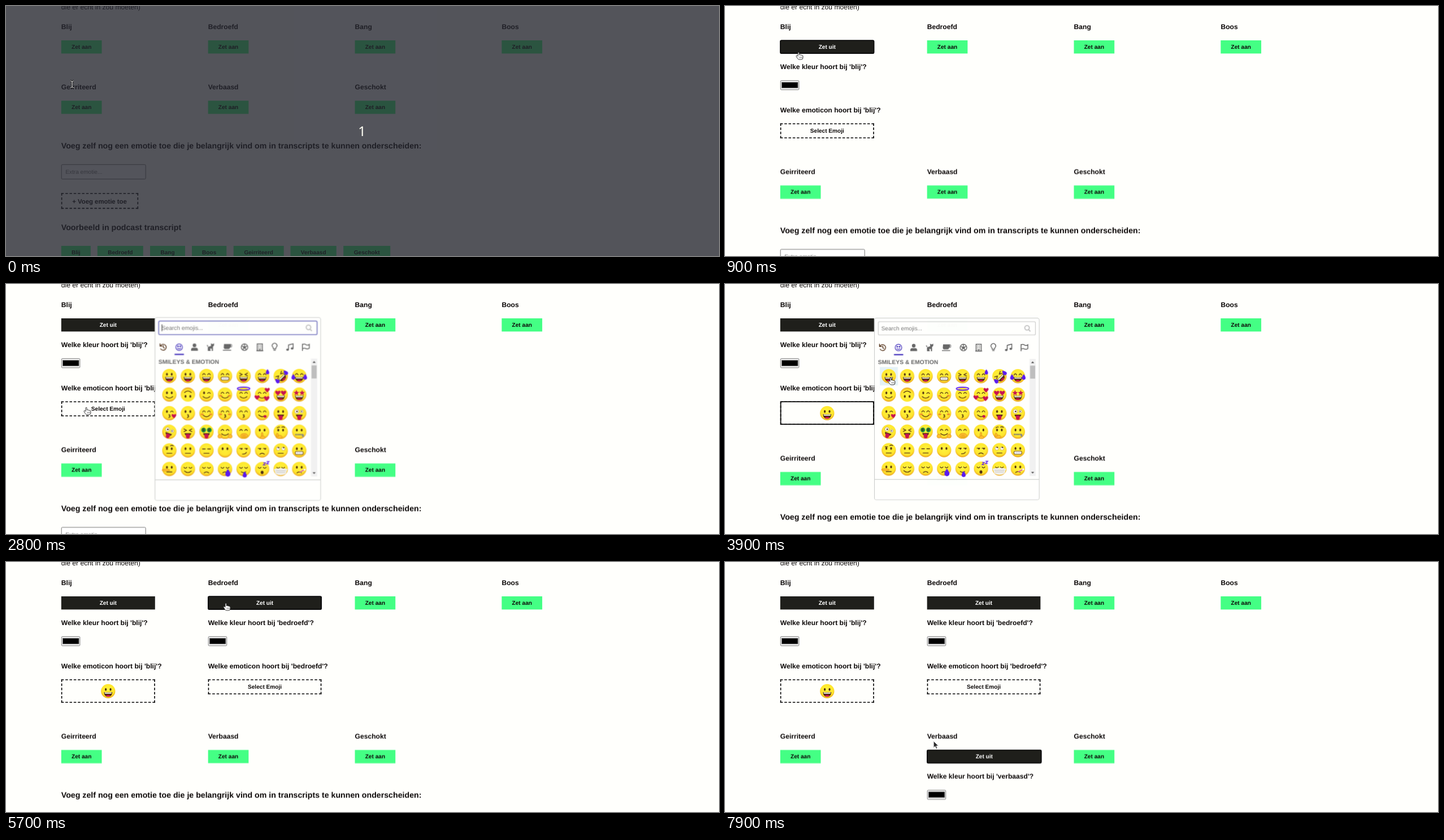
These frames come from a looping animation (1262 by 444 pixels, 8000 ms). An HTML page:

```html
<!DOCTYPE html>
<html lang="nl">
<head>
<meta charset="utf-8">
<title>Emoties</title>
<style>
html, body { margin: 0; width: 100%; height: 100%; overflow: hidden; background: #fffffc; }
svg { display: block; width: 1262px; height: 444px; }
text { font-family: "Liberation Sans", Arial, sans-serif; text-rendering: geometricPrecision; }
.b { font-weight: 700; }
.mid { text-anchor: middle; }
.line { fill: none; stroke: #4c2a10; stroke-width: 1.3; stroke-linecap: round; }
.icon { fill: none; stroke: #666; stroke-width: 1.5; }
.icon .f { fill: #666; stroke: none; }
.picker { transform-origin: 410px 222px; }
</style>
</head>
<body>
<svg id="stage" viewBox="0 0 1262 444"></svg>
<script>
const LOOP = 8000, GREEN = '#44ff84', RED = '#c8104f', BLUE = '#5a18f0';
let css = '', count = 0;

// Adds a held-step animation and returns its class name.
function steps(keys) {
  const id = 'k' + count++;
  const body = keys.map(([t, v]) => `${Math.max(0, t - 5) / LOOP * 100}%{${v}}`).join('');
  css += `@keyframes ${id}{${body}}.${id}{animation:${id} ${LOOP}ms step-end infinite}`;
  return id;
}

function during(from, to, body) {
  const keys = [[0, `opacity:${from ? 0 : 1}`]];
  if (from) keys.push([from, 'opacity:1']);
  if (to < LOOP) keys.push([to, 'opacity:0']);
  return `<g class="${steps(keys)}">${body}</g>`;
}

const moved = (keys, body) =>
  `<g class="${steps(keys.map(([t, y]) => [t, `transform:translateY(${y}px)`]))}">${body}</g>`;
const at = (x, y, body, more = '') => `<g transform="translate(${x} ${y})${more}">${body}</g>`;
const text = (x, y, s, size = 12.12, cls = 'b', fill = '#0c0808') =>
  `<text x="${x}" y="${y}" font-size="${size}" class="${cls}" fill="${fill}">${s}</text>`;
const rect = (x, y, w, h, fill, more = '') =>
  `<rect x="${x}" y="${y}" width="${w}" height="${h}" fill="${fill}" ${more}/>`;
const path = (d, more = 'class="line"') => `<path d="${d}" ${more}/>`;
const shape = (d, fill) => path(d, `fill="${fill}"`);
const dot = (x, y, rx, ry = rx, fill = '#4c2a10', more = '') =>
  `<ellipse cx="${x}" cy="${y}" rx="${rx}" ry="${ry}" fill="${fill}" ${more}/>`;

function dashed(x, y, w, h) {
  const side = (d, len) => {
    const n = Math.round((len + 3) / 7.5), gap = (len - n * 4.5) / (n - 1);
    return path(d, `fill="none" stroke="#000" stroke-width="1.6" stroke-dasharray="4.5 ${gap}"`);
  };
  return side(`M${x} ${y + .8}h${w}`, w) + side(`M${x} ${y + h - .8}h${w}`, w) +
    side(`M${x + .8} ${y}v${h}`, h) + side(`M${x + w - .8} ${y}v${h}`, h);
}

const ring = (x, y, w, h) =>
  rect(x + .2, y + .2, w - .4, h - .4, 'none', 'rx="2.2" stroke="#080808" stroke-width="1.7"');

const button = (x, y, w, label, dark) =>
  rect(x, y, w, 23.4, dark ? '#1f1f1b' : GREEN) +
  text(x + w / 2, y + 15.2, label, 10.1, 'b mid', dark ? '#fff' : '#0c0808');
const off = (x, y) => button(x, y, 71.7, 'Zet aan');

const colorBox = (x, y) =>
  rect(x + .5, y + .5, 32.6, 16.4, '#efefef', 'rx="1.5" stroke="#767676" stroke-width=".9"') +
  rect(x + 2.6, y + 3.6, 28.6, 10, '#000', 'stroke="#777" stroke-width=".7"');

const panel = (x, y, w, name) =>
  button(x, y, w, 'Zet uit', true) +
  text(x, y + 50.8, `Welke kleur hoort bij '${name}'?`) +
  colorBox(x, y + 70.9) +
  text(x, y + 127.5, `Welke emoticon hoort bij '${name}'?`);

const selectBox = (x, y, w) =>
  dashed(x, y, w, 26.6) + text(x + w / 2, y + 16.8, 'Select Emoji', 10.1, 'b mid');

// Emoji: one letter per facial part.
const heart = (x, y, s) =>
  path('M0 3.5Q-5-.5-3.3-2.6-1.5-4 0-1.8 1.5-4 3.3-2.6 5-.5 0 3.5z', `fill="${RED}" transform="translate(${x} ${y}) scale(${s})"`);
const star = x => path('M0-5l1.4 3.2 3.5.3-2.7 2.3.9 3.5L0 2.4l-3.1 1.9.9-3.5-2.7-2.3 3.5-.3z', `fill="${RED}" transform="translate(${x} -3)"`);
const drop = (x, y, s = 1) => path('M0-4q3 4 3 6a3 3 0 0 1-6 0q0-2 3-6z', `fill="${BLUE}" transform="translate(${x} ${y}) scale(${s})"`);
const hand = (x, y, rx, ry) => dot(x, y, rx, ry, '#ffc02c', 'stroke="#d98a14" stroke-width=".8"');
const white = (x, r) => dot(x, -3, r, r, '#fff', 'stroke="#9a6a20" stroke-width=".5"');
const eye = x => dot(x, -3, 1.6, 2.4);
const tongue = x => shape(`M${x - 3.4} 4h6.8v4q0 4-3.4 4t-3.4-4z`, RED);
const parts = {
  o: eye(-4.2) + eye(4.2),
  a: path('M-6.8-2q2.4-4.4 4.8 0M2-2q2.4-4.4 4.8 0'),
  u: path('M-6.8-3q2.4 3.4 4.8 0M2-3q2.4 3.4 4.8 0'),
  x: path('M-7-5l4.6 2.4-4.6 2.4M7-5l-4.6 2.4 4.6 2.4'),
  w: eye(-4.2) + path('M2-2q2.4-3.4 4.8 0'),
  h: heart(-5, -3, 1.25) + heart(5, -3, 1.25),
  s: star(-5) + star(5),
  l: path('M-7-2.5h5M2-2.5h5'),
  r: white(-4.6, 3) + white(4.6, 3) + dot(-4, -4.8, 1.2) + dot(5.2, -4.8, 1.2),
  c: white(-4.5, 3.6) + white(4.5, 2.6) + dot(-4, -3, 1.4) + dot(4.2, -3, 1),
  v: path('M-7-3.4h5M2-3.4h5') + dot(-3.6, -2.4, 1.3) + dot(5.2, -2.4, 1.3),
  d: dot(-5, -3, 4.2, 4.2, '#109848') + dot(5, -3, 4.2, 4.2, '#109848') +
     path('M-3.8-5q-3.4-.6-2.6 1.2t2.4 1.3-2.6 1.4M6.2-5q-3.4-.6-2.6 1.2t2.4 1.3-2.6 1.4'),
  D: shape('M-7.4 1.5q7.4 1.4 14.8 0-.4 8.3-7.4 8.3t-7.4-8.3z', '#4c2a10') +
     shape('M-6.3 2.2q6.3 1 12.6 0l-.6 2.2h-11.4z', '#fff') + dot(0, 8, 3.6, 1.6, RED),
  G: rect(-7, 1.8, 14, 5.6, '#fff', 'rx="2.6" stroke="#6a4010" stroke-width="1"') +
     path('M-6.5 4.6h13M-3 2v5M0 2v5M3 2v5', 'stroke="#aaa" stroke-width=".5"'),
  S: path('M-6 3.5q6 5.6 12 0'),
  k: path('M-1 2.5q3.6.4 1 2.5 3.4.8-1 3'),
  P: shape('M-6 2.6h12q-1 5-6 5t-6-5z', '#4c2a10') + tongue(0),
  p: path('M-6 3q6 6 11 1') + dot(5.2, 5.8, 2.6, 2.2, RED),
  f: path('M-4.6 5.2h9.2'),
  n: path('M-4 6.8q4-3.4 8 0'),
  m: path('M-2 6.6q5 .5 7-3'),
  O: dot(0, 6, 2.5, 3),
  W: drop(9.5, -8),
  T: drop(-10.4, 1, 1.1) + drop(10.4, 1, 1.1),
  H: dot(0, -10.5, 11, 2.6, 'none', `stroke="${BLUE}" stroke-width="1.8"`),
  L: heart(-9, 5, 1.2) + heart(8, 7, 1.3) + heart(9, -8, 1.2),
  K: heart(8, 5, 1.1),
  B: dot(-7.6, 2, 2.6, 1.8, '#f09428') + dot(7.6, 2, 2.6, 1.8, '#f09428'),
  Y: hand(-9, 8, 3.6, 3.4) + hand(9, 8, 3.6, 3.4),
  J: hand(1, 6.5, 6.2, 3.6) + path('M-3 6h7M-2 8h6', 'stroke="#d98a14" stroke-width=".7"'),
  I: hand(0, 6.2, 1.5, 5.4) + hand(1, 10, 4, 2.6),
  Q: hand(-3, 9, 5.6, 3) + hand(-6, 6, 1.8, 3.6) + path('M-6-7q2-2 4-1M2-8q3-1.5 5 .5'),
  Z: path('M-7 5h14', 'stroke="#777" stroke-width="2.6" stroke-dasharray="1.6 .6"') + rect(5, 5, 3, 4, '#888'),
  E: path('M-6.6-6h4.6M2-8q2.4-1.8 5 0'),
  N: hand(-6, 2, 7, 1.8),
  X: drop(5, 6, 1.5),
  A: path('M-4 5q4 3 8 0') + drop(2, 9, 1.2),
  z: path('M2-11h4l-4 4h4M8-13h4l-4 4h4', `fill="none" stroke="${BLUE}" stroke-width="1.3"`),
  M: shape('M-12 0Q0-3 12 0l-3 8.6q-9 5-18 0z', '#f2f0ea') + path('M-9 3h18M-8 6h16', 'stroke="#bbb" stroke-width=".8"'),
  F: path('M1 5.5l10-5', 'stroke="#fff" stroke-width="2.6"') + path('M0 6l8-4', `stroke="${RED}" stroke-width="1.2"`)
};
const turns = { V: 180, R: -45, C: 20 };
function emoji(x, y, code) {
  const turn = turns[code.at(-1)] || 0;
  const face = [...code].map(c => parts[c] || '').join('');
  return at(x, y, dot(0, 0, 12.6, 12.6, 'url(#skin)') + face, ` rotate(${turn})`);
}
const faces = ['oD oD aD aG xD aDW xDTR aDT', 'oS oSV wS aSB aSH aSL hD sD',
  'wkK ok aSB akB ak ap oP cP', 'cPC xP dP aSY aJ oI oQ oZ',
  'ofE of lf o vm vn rf oG', 'ofN uS un unX uA uOz uM onF'];
const grid = faces.map((row, r) => row.split(' ').map((code, c) =>
  emoji(289.8 + 32.65 * c, 163.6 + 32.85 * r, code)).join('')).join('');

// Picker
const tabs = [
  [279, path('M-4.3-3a5.3 5.3 0 1 1-.3 5.8M-5.6-6v4h4M.2-3v3.4l2.2 1.3')],
  [307, dot(0, 0, 5.8, 5.8, 'none') + dot(-2, -1.5, .9, .9, '#6152c6') + dot(2, -1.5, .9, .9, '#6152c6') + path('M-3 1.6q3 3 6 0', '')],
  [334, dot(0, -3.2, 3.2, 3.2, '#666', 'stroke="none"') + path('M-6 6.4v-2q0-3.4 3-3.4h6q3 0 3 3.4v2z', 'class="f"')],
  [362, path('M-6-4q2 0 2 4 2-2 5-2l0-5 2 1.5h1.5l2-1.5v4l-2 2v7.5h-2v-4h-3l1 4h-5v-7q-2-1-1.500-3.500z', 'class="f"')],
  [392, path('M-6-5.500h11.500q3 0 3 3t-3.500 3h-.5q0 2.800-3 2.800h-4.500q-3.500 0-3.500-3zM-8 4.600h14.500v1.600h-14.500z', 'class="f"') + path('M6-4q1.500 0 1.500 1.500T6-1', 'stroke="#fff" stroke-width="1"')],
  [422, dot(0, 0, 5.8, 5.8, 'none') + path('M0-2.600l2.800 2-1 3.200h-3.600l-1-3.200z', 'class="f"') + path('M0-6v3M-5-2l3 1M5-2l-3 1M-3 5l1.500-3M3 5l-1.500-3', '')],
  [449, rect(-4.6, -5.8, 9.2, 11.8, 'none') + path('M-2.600-3h5.200M-2.600 0h5.200M-2.600 3h5.200', 'stroke-dasharray="1.8 1.600"') + path('M0 3v3M-6 6.200h12', '')],
  [475, path('M-2 3q0-2-1.500-3.500a4.200 4.200 0 1 1 7 0Q2 1 2 3zM-2 5.300h4', '')],
  [502, path('M-2.500 4v-8l8-2v8', '') + dot(-4.2, 4.4, 2.4, 1.9, '#666', 'stroke="none"') + dot(3.8, 2.4, 2.4, 1.9, '#666', 'stroke="none"')],
  [530, path('M-6-6v12.500M-6-4.500q3-2 6 0t6-.5v7q-3 2-6 .5t-6 .5', '')]
].map(([x, body], i) => at(x, 112.8, `<g class="icon"${i == 1 ? ' style="stroke:#6152c6"' : ''}>${body}</g>`)).join('');

const popKeys = [[0, 0, 1], [2600, .5, .92], [2700, .99, 1.052], [2800, .99, 1.006], [3000, .99, 1], [4000, .15, .9], [4200, 0, .9]]
  .map(([t, o, s]) => [t, `opacity:${o};transform:scale(${s})`]);
const picker = `<g class="picker ${steps(popKeys)}">` +
  rect(264.5, 60.5, 291.6, 323, '#fffffd', 'rx="3.5" stroke="#c9cbc9"') +
  rect(271.3, 66.9, 278.2, 23.6, '#fffffd', 'rx="2" stroke="#c4c4c4"') +
  during(2600, 3900, rect(271, 66.600, 278.8, 24.2, 'none', 'rx="2.5" stroke="#9090d0" stroke-width="1.8"') +
    path('M276.800 72.500v12', 'stroke="#222" stroke-width="1"')) +
  text(276.6, 82.6, 'Search emojis...', 10.1, '', '#777') +
  path('M537.500 81.200l3 3M538.600 77.800a4 4 0 1 1-8 0a4 4 0 1 1 8 0', 'fill="none" stroke="#c4c4c4" stroke-width="2"') +
  tabs + rect(299, 124.2, 16.4, 2.6, '#6152c6') +
  text(270.8, 142.4, 'SMILEYS &amp; EMOTION', 10.3, 'b', '#666') +
  during(3600, 4000, rect(274, 147.4, 32, 32.6, '#e5f2f6')) + grid +
  rect(539, 133, 11, 208, '#f1f1f1') + rect(540, 145, 9, 23, '#bebebe') +
  shape('M541.800 140.500h5.400l-2.700-3.200zM541.800 333.500h5.400l-2.700 3.200z', '#555') +
  path('M264.500 347h291.600', 'stroke="#cdcfcd" stroke-width="1.2"') + '</g>';

// Page
const cols = [0, 1, 2, 3].map(i => 97.8 + 259.87 * i);
const rowOne = ['Blij', 'Bedroefd', 'Bang', 'Boos'], rowTwo = ['Geirriteerd', 'Verbaasd', 'Geschokt'];
const tagX = [97.8, 161.8, 255, 329, 402.700, 503.500, 597.200], tagW = [52, 81, 62, 61.300, 89, 81.300, 83];
const [A, B] = cols;

const top1 = text(A, 6.2, 'die er echt in zou moeten)', 12.12, '') +
  rowOne.map((s, i) => text(cols[i], 41.2, s)).join('') + off(cols[2], 61) + off(cols[3], 61) +
  during(0, 900, off(A, 61)) + during(700, 900, ring(A, 61, 71.7, 23.4)) +
  during(900, LOOP, panel(A, 61, 166, 'blij')) + during(900, 1900, ring(A, 61, 166, 23.4)) +
  during(900, 3900, selectBox(A, 208.4, 166)) + during(1900, 2600, ring(A + .6, 209, 164.8, 25.4)) +
  during(3900, LOOP, dashed(A, 208.4, 166, 41.6) + emoji(180.8, 229.4, 'oD')) +
  during(3900, 5500, ring(A + .6, 209, 164.8, 40.4)) +
  during(0, 5700, off(B, 61)) + during(5500, 5700, ring(B, 61, 71.7, 23.4)) +
  during(5700, LOOP, panel(B, 61, 200.7, 'bedroefd') + selectBox(B, 208.4, 200.7)) +
  during(5700, 7300, ring(B, 61, 200.7, 23.4));

const second = rowTwo.map((s, i) => text(cols[i], 148.4, s)).join('') + off(A, 168.2) + off(cols[2], 168.2) +
  during(0, 7400, off(B, 168.2)) + during(7300, 7400, ring(B, 168.2, 71.7, 23.4)) +
  during(7400, LOOP, panel(B, 168.2, 202.3, 'verbaasd') + ring(B, 168.2, 202.3, 23.4));

const rest = text(A, 253.1, 'Voeg zelf nog een emotie toe die je belangrijk vind om in transcripts te kunnen onderscheiden:', 14.18) +
  rect(98.2, 281.700, 149, 25.6, '#fff', 'rx="1.5" stroke="#767676"') +
  text(105.2, 298.3, 'Extra emotie...', 10.1, '', '#757575') +
  dashed(A, 332.2, 136.3, 28) + text(117.2, 350.5, '+ Voeg emotie toe', 11.36) +
  text(A, 397.600, 'Voorbeeld in podcast transcript', 14.18) +
  [...rowOne, ...rowTwo].map((s, i) => button(tagX[i], 426, tagW[i], s)).join('');

// Pointer: time, x, y, kind (i text, a arrow, h hand)
const route = `0 117 139 i,100 117 139 a,300 116 126 a,400 129 97 a,700 130 82 h,1200 132 106 a,1300 135 170 a,
1400 137 236 a,1600 146 226 h,1700 142 218 h,2400 142 219 h,3200 150 216 h,3300 178 205 a,3400 222 192 a,3500 262 180 a,
3600 287 170 h,3700 293 166 h,4000 293 166 a,4200 270 186 a,4300 235 204 a,4400 200 220 h,4500 172 226 h,4600 163 226 h,
4700 205 200 a,4800 300 158 a,4900 367 129 a,5100 377 101 a,5200 391 73 h,5500 389 73 h,5800 400 76 h,5900 425 90 a,
6000 468 118 a,6100 520 146 a,6200 575 156 a,6300 630 142 a,6400 675 112 a,6500 705 78 a,6600 692 110 a,6700 655 170 a,
6800 600 240 a,6900 545 310 a,7000 509 348 a,7200 395 344 h,7300 388 342 h,7600 386 337 h,7700 380 328 a,7800 373 321 a,
7900 369 318 a`.split(',').map(s => s.trim().split(' '));
const kinds = {
  i: path('M-3-6q2 0 3 1.500Q1-6 3-6M0-4.500v9M-3 6q2 0 3-1.500Q1 6 3 6', 'fill="none" stroke="#111" stroke-width="3"') +
     path('M-3-6q2 0 3 1.500Q1-6 3-6M0-4.500v9M-3 6q2 0 3-1.500Q1 6 3 6', 'fill="none" stroke="#eee" stroke-width="1.2"'),
  a: path('M.3.3v11.400l2.700-2.500 1.900 4.300 1.800-.8-1.900-4.200h3.700z', 'fill="#2a2a2a" stroke="#ddd" stroke-width=".8"'),
  h: path('M-1 1.500q0-1.300 1.100-1.300t1.100 1.300v3.300q2-.8 2.600.3 1.500-.4 2 .6 2.200-.3 2.200 1.600v2.500q0 3.200-3 3.200H1.200q-1.700 0-2.700-1.700l-2.300-3.600q-.6-1.400.6-1.800 1-.2 2.200 1.400z',
     'fill="#fff" stroke="#222" stroke-width=".9"') + path('M2.200 8v2.600M4.200 8v2.600M6.200 8v2.600', 'stroke="#222" stroke-width=".6"')
};
const pointer = `<g class="${steps(route.map(([t, x, y]) => [t, `transform:translate(${x}px,${y}px)`]))}">` +
  Object.keys(kinds).map(k =>
    `<g class="${steps(route.map(r => [r[0], `opacity:${+(r[3] == k)}`]))}">${kinds[k]}</g>`).join('') + '</g>';

const veil = during(0, 100, rect(0, 0, 1262, 444, 'rgba(36,38,46,.785)') +
  '<text x="630" y="231" font-size="24" class="mid" fill="#fffff4" style="font-family:\'Noto Sans\',\'Open Sans\',sans-serif">1</text>');

document.getElementById('stage').innerHTML =
  `<defs><radialGradient id="skin" cy=".4" r=".62"><stop offset="0" stop-color="#fff43c"/>
  <stop offset=".7" stop-color="#ffe62c"/><stop offset="1" stop-color="#e8991c"/></radialGradient></defs>` +
  rect(0, 0, 1262, 444, '#fffffc') + top1 +
  moved([[0, 0], [900, 150.5], [3900, 165.6]], second) +
  moved([[0, 0], [900, 150.5], [3900, 165.6], [7400, 316]], rest) +
  picker + veil + pointer;
document.head.appendChild(document.createElement('style')).textContent = css;
</script>
</body>
</html>
```
